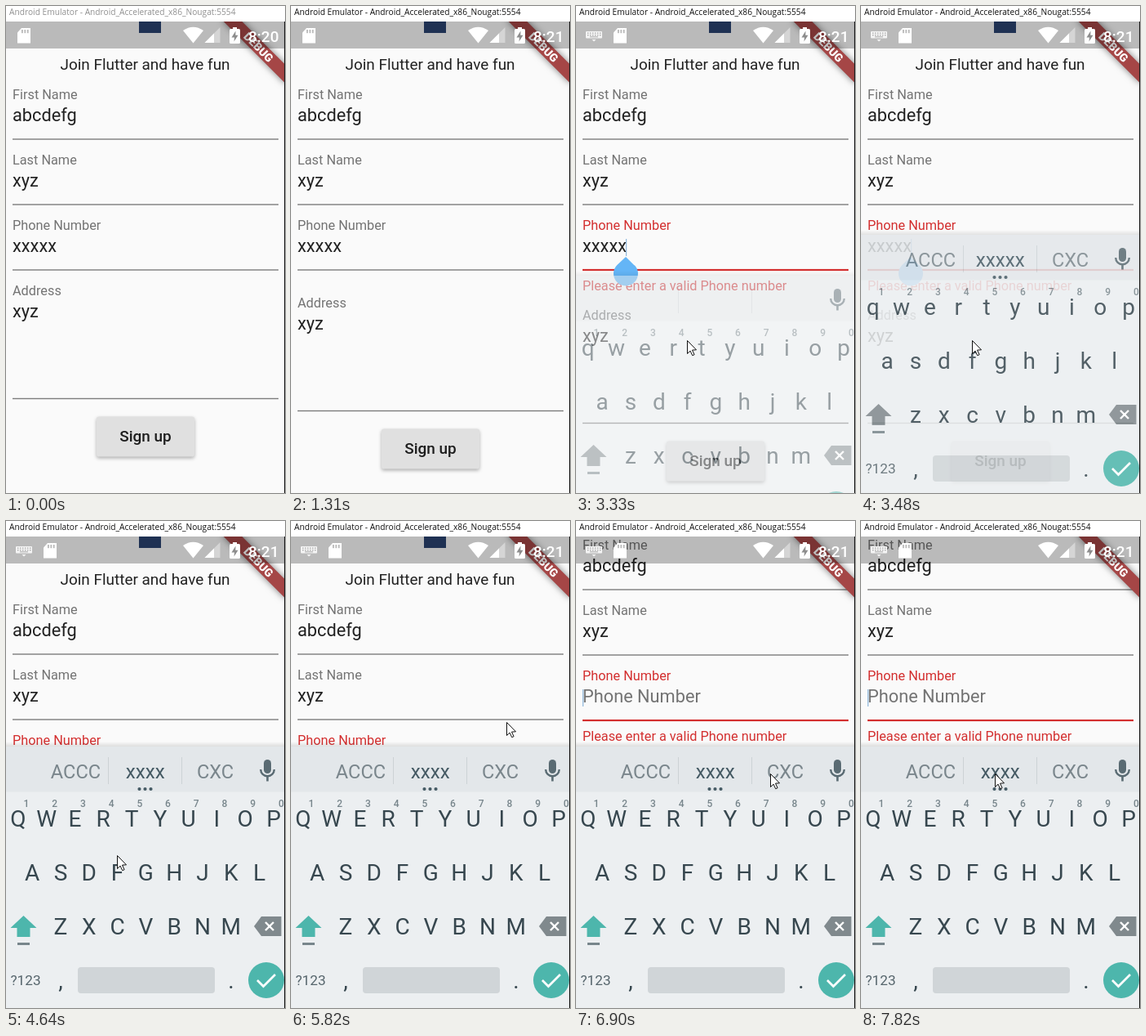
These frames come from a looping animation (342 px wide and 596 px high, 8 s). An HTML page with a canvas:

```html
<!DOCTYPE html>
<html lang="en">
<head>
<meta charset="utf-8">
<title>Sign up form</title>
<style>
html, body { margin: 0; width: 100%; height: 100%; overflow: hidden; background: #fff; }
canvas { display: block; }
</style>
</head>
<body>
<canvas id="stage" width="342" height="596"></canvas>
<script>
const W = 342, H = 596, LOOP = 8000, TOP = 19, STEP = 78;
const stage = document.getElementById('stage').getContext('2d');
const keys = document.createElement('canvas');
keys.width = W;
keys.height = H;
const keyCtx = keys.getContext('2d');

const RED = '#d32f2f', INK = 'rgba(0,0,0,.87)', GREY = 'rgba(0,0,0,.54)';
const TEAL = '#4db6ac', SLATE = '#37474f', MID = '#78868c', KEY_GREY = '#80898d';

// Progress 0..1 from time a to b, in steps as coarse as a screen recording
function ramp(t, a, b) {
  if (t < a) return 0;
  if (t >= b) return 1;
  const n = Math.round((b - a) / STEP);
  return (Math.floor((t - a) / (b - a) * n) + 1) / (n + 1);
}

const smooth = k => k * k * (3 - 2 * k);
const mix = (a, b, k) => a + (b - a) * k;

function text(c, str, x, y, size, color, align = 'left', weight = 400, family = 'Roboto') {
  c.font = `${weight} ${size}px ${family}, sans-serif`;
  c.textAlign = align;
  c.fillStyle = color;
  c.fillText(str, x, y);
}

function rect(c, x, y, w, h, fill) {
  c.fillStyle = fill;
  c.fillRect(x, y, w, h);
}

function box(c, x, y, w, h, r, fill) {
  c.beginPath();
  c.roundRect(x, y, w, h, r);
  c.fillStyle = fill;
  c.fill();
}

function disc(c, x, y, r, fill) {
  c.beginPath();
  c.arc(x, y, r, 0, Math.PI * 2);
  c.fillStyle = fill;
  c.fill();
}

function poly(c, pts, fill) {
  c.beginPath();
  for (let i = 0; i < pts.length; i += 2) c.lineTo(pts[i], pts[i + 1]);
  c.closePath();
  c.fillStyle = fill;
  c.fill();
}

function stroke(c, pts, width, color) {
  c.beginPath();
  for (let i = 0; i < pts.length; i += 2) c.lineTo(pts[i], pts[i + 1]);
  c.lineWidth = width;
  c.strokeStyle = color;
  c.stroke();
}

function field(c, y, label, value, color = GREY, height = 60, thick = 1.4) {
  text(c, label, 8, y + 11, 16.3, color);
  text(c, value, 8, y + 38, 21.78, INK);
  rect(c, 8, y + height - thick / 2, 326, thick, color === RED ? RED : 'rgba(0,0,0,.5)');
}

function handle(c, x, y) {
  const r = 15, d = r * Math.SQRT1_2;
  c.beginPath();
  c.moveTo(x, y);
  c.lineTo(x + d, y + d);
  c.arc(x, y + 20.5, r, -Math.PI / 4, Math.PI * 1.25);
  c.closePath();
  c.fillStyle = '#64b5f6';
  c.fill();
}

function form(c, t) {
  const shift = 30 * ramp(t, 1310, 1390);
  const error = ramp(t, 1540, 1620);
  const focused = t >= 3020, empty = t >= 4640;
  c.save();
  c.translate(0, -Math.round(79 * smooth(ramp(t, 6190, 6900))));

  rect(c, 163, 6, 27, 27, '#2a4270');
  text(c, 'Join Flutter and have fun', 170.5, 78, 18.95, INK, 'center');
  field(c, 103, 'First Name', 'abcdefg');
  field(c, 183, 'Last Name', 'xyz');
  field(c, 263, 'Phone Number', empty ? '' : 'xxxxx', error ? RED : GREY, 60, focused ? 2.2 : 1.4);
  if (empty) text(c, 'Phone Number', 8, 301, 21.78, GREY);
  c.globalAlpha = error;
  text(c, 'Please enter a valid Phone number', 8, 348, 16.3, RED);
  c.globalAlpha = 1;
  field(c, 343 + shift, 'Address', 'xyz', GREY, 137.5);

  c.shadowColor = 'rgba(0,0,0,.3)';
  c.shadowBlur = 4;
  c.shadowOffsetY = 2;
  box(c, 111, 502.5 + shift, 120, 49, 2.7, '#e0e0e0');
  c.shadowColor = 'transparent';
  text(c, 'Sign up', 171, 533 + shift, 18.95, INK, 'center', 500);

  const lit = !empty || Math.floor((t - 7600) / 500) % 2 === 0;
  if (t >= 2700 && lit) rect(c, empty ? 8 : 61, 285, 1.2, 21, '#90b8dc');
  if (focused && !empty) handle(c, 61, 307);
  c.restore();
}

function banner(c) {
  c.save();
  c.translate(341, TOP);
  c.rotate(Math.PI / 4);
  c.shadowColor = 'rgba(0,0,0,.5)';
  c.shadowBlur = 8;
  rect(c, -54, 36.5, 108, 16, '#a54646');
  c.shadowColor = 'transparent';
  text(c, 'DEBUG', 0, 49.4, 13.9, '#fff', 'center', 900);
  c.restore();
}

function statusBar(c, t) {
  const typing = t >= 3250;
  rect(c, 0, TOP, 341, 33, 'rgba(0,0,0,.26)');

  if (typing) {
    box(c, 12, 31, 20, 8.5, 1, '#f4f4f4');
    for (let i = 0; i < 12; i++) {
      rect(c, 14 + i % 6 * 3, i < 6 ? 32.5 : 35, 1.4, 1.4, '#a8a8a8');
    }
    rect(c, 17, 37.3, 10, 1, '#a8a8a8');
    poly(c, [19.5, 41, 24.5, 41, 22, 43.5], '#f4f4f4');
  }

  const x = typing ? 46 : 14;
  poly(c, [x + 5, 27, x + 16, 27, x + 16, 45.5, x, 45.5, x, 32.5], '#fff');
  for (let i = 0; i < 3; i++) rect(c, x + 5 + i * 3.4, 29, 1.8, 4.2, '#b9b9b9');

  c.beginPath();
  c.moveTo(229.5, 45.5);
  c.lineTo(217, 30);
  c.quadraticCurveTo(229.5, 21.5, 242, 30);
  c.closePath();
  c.fillStyle = '#fff';
  c.fill();

  poly(c, [262.5, 26, 262.5, 45, 243.5, 45], 'rgba(255,255,255,.4)');
  poly(c, [255, 33.5, 255, 45, 243.5, 45], '#fff');

  box(c, 274, 28, 13, 18, 1.5, '#fff');
  rect(c, 278, 26, 5, 3, '#fff');
  poly(c, [281.5, 30.5, 276.5, 38.5, 280, 38.5, 279.5, 43.5, 284.5, 35.8, 281.3, 35.8], '#8d8d8d');

  text(c, t < 360 ? '8:20' : '8:21', 297, 43.5, 19, '#fff', 'left', 500);
}

function mic(c, x, y) {
  const col = '#5a6b73';
  box(c, x - 4.5, y - 13, 9, 17, 4.5, col);
  c.beginPath();
  c.arc(x, y - 1, 8.3, 0, Math.PI);
  c.lineWidth = 2.4;
  c.strokeStyle = col;
  c.stroke();
  rect(c, x - 1.3, y + 7, 2.6, 6.5, col);
}

function suggestions(c, t) {
  rect(c, 0, 276, 341, 56, '#e3e7ea');
  rect(c, 125, 289, 1, 33, '#ccd2d5');
  rect(c, 215, 289, 1, 33, '#ccd2d5');
  mic(c, 320.5, 305);
  if (t < 3400) return;
  text(c, 'ACCC', 85.5, 315, 23.6, '#7a868c', 'center');
  text(c, t < 4190 ? 'xxxxx' : 'xxxx', 170.8, 315, 24.2, '#455a64', 'center');
  text(c, 'CXC', 256.5, 315, 23.6, '#7a868c', 'center');
  for (let i = -1; i < 2; i++) disc(c, 170.5 + i * 7, 328, 2.1, '#455a64');
}

function keyboard(c, t) {
  const caps = t >= 4640, pitch = 34.8;
  c.clearRect(0, 0, W, H);
  const g = c.createLinearGradient(0, 270, 0, 277);
  g.addColorStop(0, 'rgba(0,0,0,0)');
  g.addColorStop(1, 'rgba(0,0,0,.13)');
  rect(c, 0, 270, 341, 7, g);
  suggestions(c, t);
  rect(c, 0, 331.5, 341, 265, '#eceff1');

  ['qwertyuiop', 'asdfghjkl', ' zxcvbnm'].forEach((row, r) => {
    const x0 = r ? 32.2 : 14.8;
    [...row].forEach((ch, i) => {
      text(c, caps ? ch.toUpperCase() : ch, x0 + i * pitch, 374 + r * 66, 28, SLATE, 'center');
    });
  });
  for (let i = 0; i < 10; i++) {
    text(c, (i + 1) % 10, 25 + i * 34.7, 350, 12, MID, 'center', 500);
  }

  poly(c, [21.5, 483, 37.5, 498, 29.5, 498, 29.5, 509, 13.5, 509, 13.5, 498, 5.5, 498], caps ? TEAL : KEY_GREY);
  rect(c, 14, 516, 15, 3, MID);

  poly(c, [304, 496, 313, 484, 337.5, 484, 337.5, 508, 313, 508], KEY_GREY);
  stroke(c, [318, 491, 328, 501], 2.4, '#fff');
  stroke(c, [328, 491, 318, 501], 2.4, '#fff');

  text(c, '?123', 24, 568, 17.2, '#56656c', 'center');
  text(c, ',', 67, 572, 28, SLATE, 'center');
  box(c, 88, 546, 168, 32, 4, '#d0d5d8');
  text(c, '.', 276, 572, 28, SLATE, 'center');
  disc(c, 319, 562, 22, TEAL);
  stroke(c, [308, 562, 315.5, 569.5, 330, 555], 2.7, '#fff');
}

// Pointer trips: start, end, then where it arrives
const TRIPS = [
  [2080, 2150, 118, 427], [3020, 3020, 136, 409], [5580, 5980, 309, 189],
  [6190, 6500, 309, 80], [6590, 6970, 232, 327], [7050, 7300, 150, 306], [7600, 7820, 164, 309]
];

function pointer(c, t) {
  let x = 160, y = 515;
  for (const [a, b, tx, ty] of TRIPS) {
    const k = smooth(ramp(t, a, b));
    x = mix(x, tx, k);
    y = mix(y, ty, k);
  }
  c.save();
  c.translate(Math.round(x) + .5, Math.round(y) + .5);
  poly(c, [0, 0, 0, 16, 3.6, 12.6, 6.2, 18.2, 8.6, 17.2, 6, 11.6, 11, 11.3], '#fff');
  c.lineWidth = 1;
  c.strokeStyle = '#111';
  c.stroke();
  c.restore();
}

function draw(t) {
  const c = stage;
  rect(c, 0, 0, W, TOP, '#fff');
  rect(c, 0, TOP, W, H - TOP, '#fafafa');

  c.save();
  c.beginPath();
  c.rect(0, TOP, 341, H - TOP);
  c.clip();
  form(c, t);
  banner(c);
  statusBar(c, t);
  if (t >= 3250) {
    const i = Math.floor((t - 3250) / 76);
    keyboard(keyCtx, t);
    c.globalAlpha = 1 - .94 * .53 ** i;
    c.drawImage(keys, 0, Math.round(76 * Math.exp(-i * i / 3)));
  }
  c.restore();

  rect(c, 341, TOP, 1, H - TOP, '#1c1c1c');
  text(c, 'Android Emulator - Android_Accelerated_x86_Nougat:5554', 4, 11, 10.2,
    t < 910 ? '#909090' : '#111', 'left', 400, '"Open Sans"');
  if (t >= 2080) pointer(c, t);
}

const begin = performance.now();
function tick() {
  draw((performance.now() - begin) % LOOP);
  requestAnimationFrame(tick);
}
tick();
</script>
</body>
</html>
```
